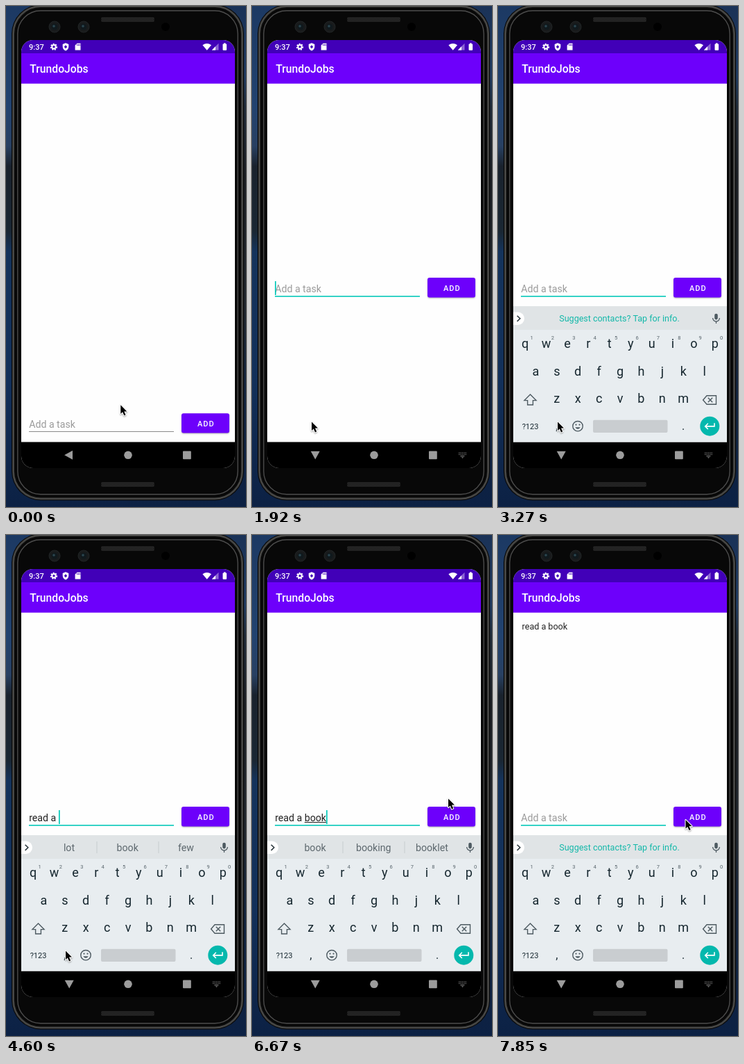
An HTML page with a canvas for the animation above (8000 ms loop, 346 by 721 pixels).

```html
<!DOCTYPE html>
<html lang="en">
<head>
<meta charset="utf-8">
<title>Task list</title>
<style>
  html, body { margin: 0; width: 100%; height: 100%; overflow: hidden; background: #0d1b30; }
  canvas { display: block; width: 346px; height: 721px; }
</style>
</head>
<body>
<canvas id="stage"></canvas>
<script>
const W = 346, H = 721, LOOP = 8000;
const TEAL = '#05c9b9', KEY = '#15262e', ICON = '#4d5a61';
const FONT = 'Roboto, "Open Sans", sans-serif';
const canvas = document.getElementById('stage');
const c = canvas.getContext('2d');
const dpr = window.devicePixelRatio || 1;
canvas.width = W * dpr;
canvas.height = H * dpr;

// time, field content, suggestions
const typing = [
  [0, ''], [3420, 'r'], [3560, 're'],
  [3860, 'rea', 'rea read real'],
  [4000, 'read', 'read ready reading'],
  [4300, 'read ', 'the it and'],
  [4450, 'read a', 'a and an'],
  [4600, 'read a ', 'lot book few'],
  [5040, 'read a b', 'b book bit'],
  [5340, 'read a bo', 'bo book box'],
  [5480, 'read a boo', 'boo book boost'],
  [5780, 'read a book', 'book booking booklet'],
  [7410, '']
];
const caretSpans = [[1620, 2220], [2670, 3270], [3420, 6230], [6670, 7850]];

// start, end, held poses, target x, target y
const moves = [
  [140, 580, 4, 111, 603],
  [880, 1170, 3, 86, 598.5],
  [6080, 6670, 5, 283, 379.5],
  [6970, 7260, 3, 270.5, 410]
];

const within = (t, a, b) => t >= a && t < b;
const ease = p => p * p * (3 - 2 * p);

function pointer(t) {
  let x = 165.3, y = 574.3;
  for (const [a, b, n, tx, ty] of moves) {
    if (t < a) break;
    const step = Math.min(n, Math.floor((t - a + 4) / (b - a) * (n - 1)) + 1);
    const p = ease(step / n);
    x += (tx - x) * p;
    y += (ty - y) * p;
  }
  return [x, y];
}

function rect(x, y, w, h, color) {
  c.fillStyle = color;
  c.fillRect(x, y, w, h);
}

function box(x, y, w, h, r, fill, line, lw = 1) {
  c.beginPath();
  c.roundRect(x, y, w, h, r);
  if (fill) { c.fillStyle = fill; c.fill(); }
  if (line) { c.strokeStyle = line; c.lineWidth = lw; c.stroke(); }
}

function disc(x, y, r, fill, line, lw = 1) {
  c.beginPath();
  c.arc(x, y, r, 0, 7);
  if (fill) { c.fillStyle = fill; c.fill(); }
  if (line) { c.strokeStyle = line; c.lineWidth = lw; c.stroke(); }
}

function shape(d, fill, line, lw = 1) {
  const p = new Path2D(d);
  if (fill) { c.fillStyle = fill; c.fill(p); }
  if (line) { c.strokeStyle = line; c.lineWidth = lw; c.stroke(p); }
}

function text(s, x, y, size, color, align = 'left', weight = 400) {
  c.font = `${weight} ${size}px ${FONT}`;
  c.textAlign = align;
  c.fillStyle = color;
  c.fillText(s, x, y);
}

function gradient(x, w, stops) {
  const g = c.createLinearGradient(0, 0, 0, H);
  stops.forEach(([at, color]) => g.addColorStop(at, color));
  rect(x, 0, w, H, g);
}

function grille(y) {
  box(137, y, 77, 7, 2, '#1d1d1d');
  for (let row = 0; row < 3; row++)
    for (let x = 138 + row % 2; x < 213; x += 2) rect(x, y + 1 + row * 2, 1, 1, '#343434');
}

// concentric rounded outline, inset from the outer edge of the body
function rim(inset, line, lw) {
  box(8 + inset, -2 + inset, 335 - 2 * inset, 713.5 - 2 * inset, 42 - inset, null, line, lw);
}

function phone() {
  gradient(0, W / 2, [[0, '#1c3963'], [.2, '#224370'], [.28, '#284062'], [.32, '#19222d'],
    [.45, '#1a2733'], [.49, '#14335c'], [.75, '#12305a'], [1, '#0c2144']]);
  gradient(W / 2, W / 2, [[0, '#1a3257'], [.14, '#1f3a5f'], [.2, '#1f2a38'], [.34, '#1a1d22'],
    [.6, '#20262d'], [.75, '#13243d'], [1, '#0c2144']]);
  box(8, -2, 335, 713.5, 42, '#080808');
  rim(2.6, '#383836', 3);
  rim(2.4, '#565654', 1);
  rim(8.8, '#4c4c4c', 1.4);
  grille(16);
  grille(685);
  for (const x of [70, 112]) {
    disc(x, 30, 8, '#191b1c', '#222627');
    disc(x, 30, 4.5, '#10191d');
    disc(x - 1, 29, 1.8, '#2b4650');
  }
  disc(230, 30, 6, '#000');
}

function statusBar() {
  rect(22, 49, 308, 19, '#4100b8');
  text('9:37', 33, 63, 11, '#fff', 'left', 500);
  c.setLineDash([1.9, 1.7]);
  disc(69, 58.8, 4.2, null, '#fff', 1.8);
  c.setLineDash([]);
  disc(69, 58.8, 2.7, null, '#fff', 2);
  shape('M86 53.2L90.3 55V58.5C90.3 61.3 88.5 63.5 86 64.4C83.5 63.5 81.7 61.3 81.7 58.5V55Z', '#fff');
  shape('M86 56.3L88.2 58.8L86 61.2L83.8 58.8Z', '#4100b8');
  shape('M102.5 53.8H107.5V63.6H99.6V56.8Z', '#fff');
  for (const x of [102.2, 104, 105.8]) rect(x, 55, .9, 2.2, '#4100b8');
  shape('M283.4 56.2Q289.7 51.8 296 56.2L289.7 63.8Z', '#fff');
  shape('M306.5 53.8V63.5H296.8Z', 'rgba(255,255,255,.4)');
  shape('M302 58.3V63.5H296.8Z', '#fff');
  box(312.5, 54.5, 5.6, 9.3, 1, '#fff');
  rect(314, 53.4, 2.6, 1.5, '#fff');
}

function navBar(t) {
  const grey = '#9c9c9c', dim = '#747474';
  rect(22, 627.5, 308, 38, '#000');
  const turn = t < 1770 ? 0 : t < 1920 ? .5 : 1;
  c.save();
  c.translate(90.5 + turn * .7, 646.3);
  c.rotate(-turn * Math.PI / 2);
  shape('M-6.3 0L5.5 -6.5V6.5Z', grey);
  c.restore();
  disc(176, 646.3, 5.8, grey);
  box(255, 640.5, 11.8, 11.8, 1, grey);
  if (turn) {
    for (let row = 0; row < 2; row++)
      for (let i = 0; i < 5; i++) rect(298 + i * 2.4, 642.5 + row * 2.3, 1.3, 1.3, dim);
    rect(300.4, 647.1, 6, 1.2, dim);
    shape('M301.6 649.3H305.4L303.5 651Z', dim);
  }
}

function button(t, y) {
  const down = within(t, 7260, 7560);
  c.save();
  c.shadowColor = 'rgba(0,0,0,.3)';
  c.shadowBlur = (down ? 5 : 2) * dpr;
  c.shadowOffsetY = (down ? 2 : 1) * dpr;
  box(253, y - 15.7, 69, 28.3, 3, '#6d00fb');
  c.restore();
  if (down) box(253, y - 15.7, 69, 28.3, 3, `rgba(255,255,255,${t < 7410 ? .22 : .1})`);
  c.letterSpacing = '1px';
  text('ADD', 276, y + 2.8, 11, '#fff', 'left', 500);
  c.letterSpacing = '0px';
}

function field(t, value) {
  const y = t < 1770 ? 602 : 406.8;
  const x = 33.2, size = 14.15, lineY = Math.round(y + 10);
  if (t < 1320) rect(33, lineY, 209, 1, '#8b8b8b');
  else rect(33, lineY, 209, 1.6, TEAL);
  text(value || 'Add a task', x, y + 4.9, size, value ? '#222' : '#9b9b9b');
  const end = x + (value ? c.measureText(value).width : 0);
  const wordAt = value.lastIndexOf(' ') + 1;
  if (wordAt < value.length) {
    const from = x + c.measureText(value.slice(0, wordAt)).width;
    rect(from, lineY - 4, end - from, 1, '#222');
  }
  if (caretSpans.some(([a, b]) => within(t, a, b))) rect(Math.round(end), lineY - 21, 1.7, 20, TEAL);
  button(t, y);
}

function keyRow(letters, y, hints) {
  [...letters].forEach((ch, i) => {
    const x = 176 + (i - (letters.length - 1) / 2) * 30.4;
    text(ch, x, y, 18, KEY, 'center');
    if (hints) text((i + 1) % 10, x + 9.3, y - 12, 7.5, '#56636a', 'center');
  });
}

function strip(words) {
  rect(22, 432, 308, 34, '#e0e4e6');
  box(14, 440.5, 24, 18.5, 9.2, '#fff');
  shape('M27.6 445.7L31.8 449.8L27.6 453.9', null, '#2c383e', 1.6);
  if (words) {
    words.split(' ').forEach((w, i) => text(w, 91 + i * 84.2, 454.7, 14.15, '#5d686e', 'center'));
    rect(130.5, 441, 1, 17, '#c6cbce');
    rect(219.5, 441, 1, 17, '#c6cbce');
  } else {
    text('Suggest contacts? Tap for info.', 175, 454.2, 12.5, '#12b8a9', 'center');
  }
  box(312.2, 442.8, 4.6, 8.6, 2.3, ICON);
  shape('M309.6 449A4.9 4.9 0 0 0 319.4 449M314.5 454V457', null, ICON, 1.3);
}

function keyboard(t, words) {
  if (t < 2070) return;
  c.save();
  if (t < 2220) { c.translate(0, 1.6); c.globalAlpha = .93; }
  rect(22, 432, 308, 195.5, '#e8edf0');
  strip(words);
  keyRow('qwertyuiop', 492.3, true);
  keyRow('asdfghjkl', 531.7);
  keyRow('zxcvbnm', 571.3);
  shape('M46.5 559L55 567.6H50.4V574H42.6V567.6H38Z', null, ICON, 1.4);
  shape('M301 560.8H314.5V573.2H301L295.6 567Z', null, ICON, 1.4);
  shape('M302.8 563.8L309.2 570.2M309.2 563.8L302.8 570.2', null, ICON, 1.4);
  text('?123', 46.5, 608.8, 11, KEY, 'center');
  text(',', 84.8, 609.5, 16, KEY, 'center');
  text('.', 267, 609.5, 16, KEY, 'center');
  disc(115, 604.7, 7.2, null, ICON, 1.4);
  disc(112.5, 602.6, 1.1, ICON);
  disc(117.5, 602.6, 1.1, ICON);
  shape('M111.2 606.2Q115 611.5 118.8 606.2Z', ICON);
  box(137, 595.7, 107.5, 18.3, 2, '#c9cdd0');
  disc(305.3, 604.7, 14, '#04b8ad');
  shape('M312 600.2V604.9H299M302.8 600.8L298.7 604.9L302.8 609', null, '#fff', 1.6);
  c.restore();
}

function arrow(x, y) {
  const d = 'M0 0V12.6L2.8 9.9L5 15L7.2 14.1L5 9.1H9Z';
  c.save();
  c.translate(x, y);
  c.lineJoin = 'round';
  c.shadowColor = 'rgba(0,0,0,.35)';
  c.shadowBlur = 2 * dpr;
  c.shadowOffsetY = dpr;
  shape(d, null, '#fff', 2.2);
  c.shadowColor = 'transparent';
  shape(d, '#000');
  c.restore();
}

function draw(t) {
  const [, value, words] = typing.filter(s => s[0] <= t).pop();
  c.setTransform(dpr, 0, 0, dpr, 0, 0);
  phone();
  c.save();
  c.beginPath();
  c.roundRect(22, 49, 308, 616, 17);
  c.clip();
  rect(22, 49, 308, 616, '#fefefe');
  rect(22, 67.5, 308, 44.2, '#6d00fb');
  statusBar();
  text('TrundoJobs', 34.3, 96, 15.7, '#fff', 'left', 500);
  if (t >= 7410) text('read a book', 34.6, 135.6, 12.55, '#222');
  field(t, value);
  navBar(t);
  keyboard(t, words);
  c.restore();
  arrow(...pointer(t));
}

const start = performance.now();
function frame() {
  draw((performance.now() - start) % LOOP);
  requestAnimationFrame(frame);
}
frame();
</script>
</body>
</html>
```
